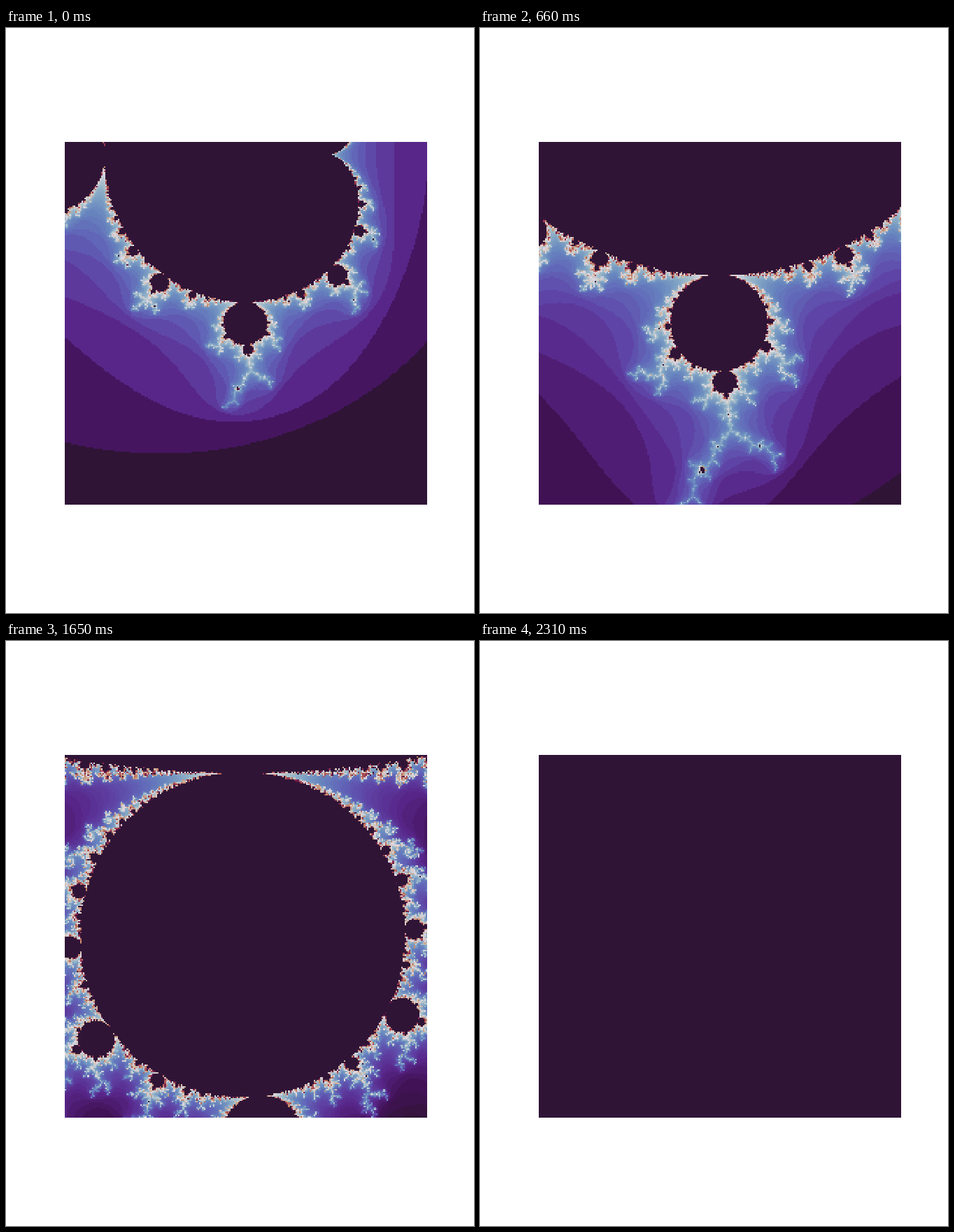
Write an HTML page with a canvas that moves like this. It is 669 px wide and 837 px high and loops after 8 s.

```html
<!DOCTYPE html>
<html lang="en">
<head>
<meta charset="utf-8">
<title>Mandelbrot zoom</title>
<style>
  html, body { margin: 0; width: 100%; height: 100%; overflow: hidden; background: #fff; }
  canvas { display: block; }
</style>
</head>
<body>
<canvas id="stage" width="669" height="837"></canvas>
<script>
const LOOP = 8000, STEP = 330, LAST = 7;
const N = 240, MAX_ITER = 1000;
const CENTER = { x: -0.123, y: 0.745 }, HALF = 0.8, ZOOM = 1.5;
const BOX = { x: 84, y: 163, w: 518, h: 519 };

// Evenly spaced stops of a cyclic dark - blue - white - red - dark map
const stops = ('2f1436 421257 582689 5e43a5 6166b8 6785be 7fa2c4 9ebbc9 c3ccd4 ' +
  'e2d9e2 d9c5bd ceac94 c58a70 ba6657 a84650 8e2c50 6b1c4b 471340 2f1436')
  .split(' ').map(h => [0, 2, 4].map(i => parseInt(h.slice(i, i + 2), 16)));

// Stops sit at 0, 1/18, 2/18 ... 1
function color(t) {
  const p = Math.min(Math.max(t, 0), 1) * (stops.length - 1);
  const i = Math.min(Math.floor(p), stops.length - 2), f = p - i;
  return stops[i].map((v, k) => Math.round(v + (stops[i + 1][k] - v) * f));
}

function inMainBody(x, y) {
  const y2 = y * y, q = (x - 0.25) ** 2 + y2;
  return q * (q + x - 0.25) < 0.25 * y2 || (x + 1) ** 2 + y2 < 0.0625;
}

function escapeCount(cx, cy) {
  if (inMainBody(cx, cy)) return MAX_ITER;
  let x = 0, y = 0, px = 0, py = 0, mark = 16;
  for (let n = 0; n < MAX_ITER; n++) {
    const x2 = x * x, y2 = y * y;
    if (x2 + y2 > 4) return n;
    y = 2 * x * y + cy;
    x = x2 - y2 + cx;
    // A repeating orbit never escapes
    if (Math.abs(x - px) + Math.abs(y - py) < 1e-14) return MAX_ITER;
    if (n === mark) { px = x; py = y; mark *= 2; }
  }
  return MAX_ITER;
}

function render(step) {
  const half = HALF / ZOOM ** step, d = 2 * half / (N - 1);
  const counts = new Uint16Array(N * N);
  let lo = MAX_ITER, hi = 0;
  for (let j = 0; j < N; j++) {
    for (let i = 0; i < N; i++) {
      const n = escapeCount(CENTER.x - half + i * d, CENTER.y - half + j * d);
      counts[j * N + i] = n;
      lo = Math.min(lo, n);
      hi = Math.max(hi, n);
    }
  }

  // Logarithmic colour scale, fitted to each view
  const range = Math.log(hi / lo) || 1;
  const shades = [];
  for (let n = lo; n <= hi; n++) shades[n] = color(Math.log(n / lo) / range);

  const tile = document.createElement('canvas');
  tile.width = tile.height = N;
  const g = tile.getContext('2d'), img = g.createImageData(N, N);
  counts.forEach((n, i) => img.data.set([...shades[n], 255], i * 4));
  g.putImageData(img, 0, 0);
  return tile;
}

const ctx = document.getElementById('stage').getContext('2d');
ctx.imageSmoothingEnabled = false;
const tiles = [];
let shown = -1;

function draw(time) {
  const step = Math.min(Math.floor((time % LOOP) / STEP), LAST);
  if (step === shown) return;
  shown = step;
  tiles[step] = tiles[step] || render(step);
  ctx.fillStyle = '#fff';
  ctx.fillRect(0, 0, 669, 837);
  ctx.drawImage(tiles[step], BOX.x, BOX.y, BOX.w, BOX.h);
}

function tick() {
  draw(performance.now());
  requestAnimationFrame(tick);
}

draw(0);
tick();
</script>
</body>
</html>
```
